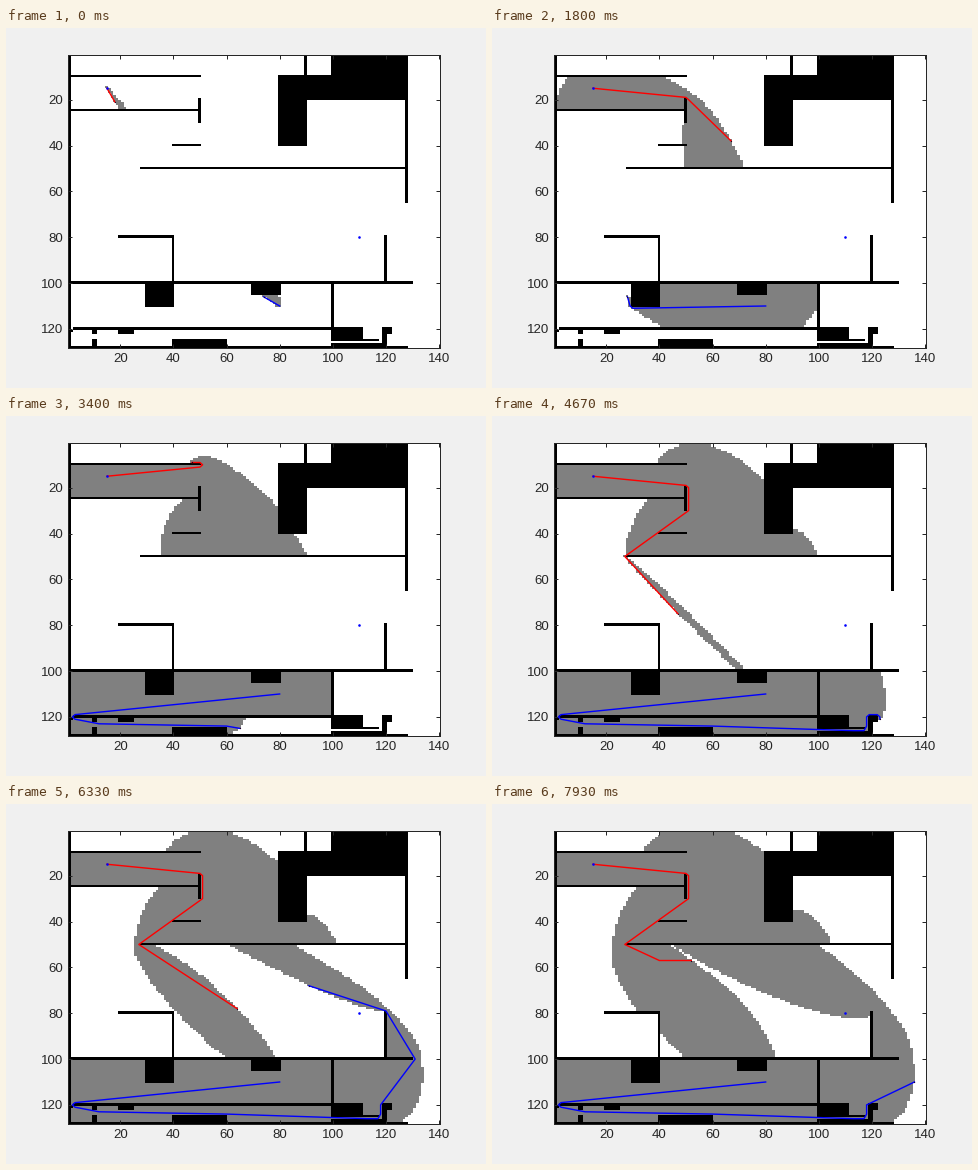
Recreate the animation shown at these times as a matplotlib script. Size 480x360 px, loop 8000 ms.

```python
import math

import numpy as np
import matplotlib.pyplot as plt
from matplotlib.animation import FuncAnimation

W, H = 140, 128
FRAMES = 120
PER_FRAME = 40
FIRST = 20
TOTAL = FIRST + PER_FRAME * FRAMES
START, GOAL, MARK = (15, 15), (80, 110), (110, 80)
PX = 0.72  # points per pixel at 100 dpi

plt.rcParams["font.family"] = "Liberation Sans"

# Walls as inclusive boxes: first column, last column, first row, last row
WALLS = [
    (1, 1, 1, 128), (1, 128, 128, 128), (128, 128, 1, 65),
    (1, 50, 10, 10), (1, 50, 25, 25), (50, 50, 20, 30), (40, 50, 40, 40),
    (28, 128, 50, 50), (90, 90, 1, 10), (100, 128, 1, 20),
    (80, 90, 10, 40), (80, 128, 10, 20),
    (20, 40, 80, 80), (40, 40, 80, 100), (120, 120, 80, 100),
    (1, 130, 100, 100), (30, 40, 100, 110), (70, 80, 100, 105),
    (100, 100, 100, 124), (100, 111, 120, 124), (100, 117, 125, 125),
    (100, 120, 127, 128), (119, 120, 120, 127), (119, 122, 120, 122),
    (3, 100, 120, 120), (1, 2, 121, 121), (10, 11, 120, 122),
    (20, 25, 120, 122), (10, 11, 125, 128), (40, 60, 125, 128),
]

blocked = np.ones((H + 2, W + 2), bool)
blocked[1:-1, 1:-1] = False
for x0, x1, y0, y1 in WALLS:
    blocked[y0:y1 + 1, x0:x1 + 1] = True

STEPS = [(dx, dy) for dx in (-1, 0, 1) for dy in (-1, 0, 1) if dx or dy]


def dist(a, b):
    return math.hypot(a[0] - b[0], a[1] - b[1])


def sees(a, b):
    """Line of sight with one sample per step along the longer axis."""
    n = max(abs(a[0] - b[0]), abs(a[1] - b[1]))
    if n <= 1:
        return True
    t = np.arange(n + 1) / n
    xs = np.rint(a[0] + (b[0] - a[0]) * t).astype(int)
    ys = np.rint(a[1] + (b[1] - a[1]) * t).astype(int)
    return not blocked[ys, xs].any()


def search(start, goal, count):
    """Any-angle A*: the cells in order of expansion and their parents."""
    queue = np.full(blocked.shape, np.inf)
    cost, parent = {start: 0.0}, {start: start}
    order, closed = [], set()

    def push(cell):
        h = dist(cell, goal)
        queue[cell[1], cell[0]] = cost[cell] + h * 1.000001

    push(start)
    while len(order) < count:
        k = int(queue.argmin())
        y, x = divmod(k, W + 2)
        if queue[y, x] == np.inf:
            break
        cell = (x, y)
        around = [(x + dx, y + dy) for dx, dy in STEPS]
        if not sees(parent[cell], cell):
            options = []
            for p in around:
                if p in closed:
                    options.append((cost[p] + dist(p, cell), p))
            for q in {parent[p] for _, p in options}:
                if sees(q, cell):
                    options.append((cost[q] + dist(q, cell), q))
            cost[cell], parent[cell] = min(options)
            push(cell)
            continue
        queue[y, x] = np.inf
        closed.add(cell)
        order.append(cell)
        root = parent[cell]
        for p in around:
            if blocked[p[1], p[0]] or p in closed:
                continue
            c = cost[root] + dist(root, p)
            if c < cost.get(p, np.inf) - 1e-9:
                cost[p], parent[p] = c, root
                push(p)
    return order, parent


def trace(cell, parent):
    path = [cell]
    while parent[cell] != cell:
        cell = parent[cell]
        path.append(cell)
    return np.array(path).T


searches = [search(START, GOAL, TOTAL), search(GOAL, START, TOTAL)]

fig = plt.figure(figsize=(4.8, 3.6), dpi=100, facecolor="#f0f0f0")
ax = fig.add_axes([0.13, 0.11, 0.775, 0.815])
base = np.where(blocked, 0.0, 1.0)[1:-1, 1:-1]
image = ax.imshow(base, cmap="gray", vmin=0, vmax=1, aspect="auto",
                  interpolation="nearest",
                  extent=(0.5, W + 0.5, H + 0.5, 0.5))

INK = "#262626"
ax.set_xticks(range(20, 141, 20))
ax.set_yticks(range(20, 121, 20))
ax.tick_params(direction="in", top=True, right=True, length=3.7 * PX,
               width=PX, color=INK, labelcolor=INK,
               labelsize=13.3 * PX, pad=5 * PX)
for spine in ax.spines.values():
    spine.set(linewidth=PX, color=INK)

lines = [ax.plot([], [], color=c, lw=1.4 * PX, zorder=3)[0]
         for c in ("red", "blue")]
tips = [ax.plot([], [], ".", color="#200020", ms=2.5 * PX, mew=0, zorder=4)[0]
        for _ in lines]
dots = ax.plot(*zip(START, MARK), ls="", marker="o", color="blue",
               ms=2.6 * PX, mew=0, zorder=5)[0]
ends = [ax.plot(*p, marker="o", ms=7 * PX, mfc=c, mec="black", mew=PX,
                zorder=6)[0]
        for p, c in ((START, "blue"), (GOAL, "red"))]


def draw(i):
    done = i == FRAMES - 1
    cells = base.copy()
    for (order, parent), line, tip in zip(searches, lines, tips):
        seen = order[:FIRST + PER_FRAME * i]
        xs, ys = np.array(seen).T
        cells[ys - 1, xs - 1] = 0.5
        path = trace(seen[-1], parent)
        line.set_data(*path)
        tip.set_data(path[0, :1], path[1, :1])
    image.set_data(cells)
    for art in (*lines, *tips, dots):
        art.set_visible(not done)
    for art in ends:
        art.set_visible(done)
    return [image, *lines, *tips, dots, *ends]


anim = FuncAnimation(fig, draw, frames=FRAMES, interval=8000 / FRAMES,
                     init_func=lambda: draw(0), repeat=True, repeat_delay=0)
plt.show()
```
